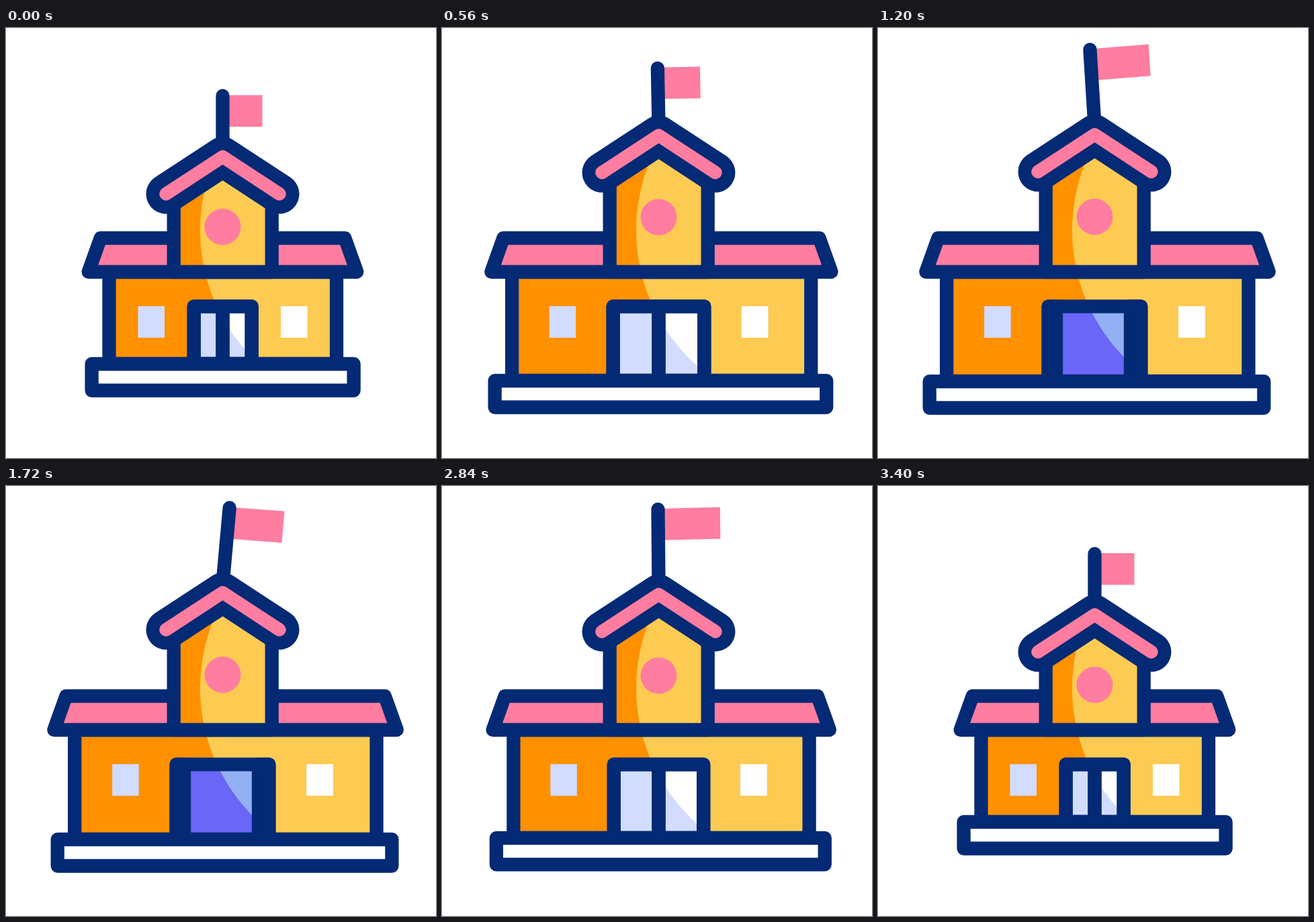
Recreate the animation shown at these times as an HTML page with a canvas. Size 640x640 px, loop 3560 ms.

```html
<!DOCTYPE html>
<html lang="en">
<head>
<meta charset="utf-8">
<title>School</title>
<style>
html, body { margin: 0; width: 100%; height: 100%; overflow: hidden; background: #fff; }
canvas { display: block; width: 640px; height: 640px; }
</style>
</head>
<body>
<canvas id="stage" width="640" height="640"></canvas>
<script>
const ctx = document.getElementById('stage').getContext('2d');
const NAVY = '#042a75', PINK = '#ff7da0';
const WALL = ['#ff9100', '#fdcb52'];
const GLASS = ['#d2dcff', '#ffffff'];
const HALL = ['#6a66f7', '#92b0f3'];
const LOOP = 3560, MID = 322.5;

// Lists of [time, value], eased between neighbours
const GROW = [[240, 0], [607, 1], [2730, 1], [3330, 0]];
const POLE = [[392, 0], [886, 1], [2840, 1], [3395, 0]];
const DOOR = [[700, 0], [1160, 1], [2410, 1], [2800, 0]];
const SWAY = [[350, 0], [1040, -5], [1700, 5.2], [2340, -5.1], [2970, 0]];
const FLAG = [[300, 49], [1400, 80], [2240, 55], [2860, 82.5], [3390, 49]];

const lerp = (a, b, u) => a + (b - a) * u;

function track(keys, t) {
  if (t <= keys[0][0]) return keys[0][1];
  for (let i = 1; i < keys.length; i++) {
    const [t0, v0] = keys[i - 1], [t1, v1] = keys[i];
    if (t < t1) return lerp(v0, v1, (1 - Math.cos(Math.PI * (t - t0) / (t1 - t0))) / 2);
  }
  return keys[keys.length - 1][1];
}

function poly(closed, ...xy) {
  const path = new Path2D();
  for (let i = 0; i < xy.length; i += 2) path.lineTo(xy[i], xy[i + 1]);
  if (closed) path.closePath();
  return path;
}

const box = (x0, y0, x1, y1) => poly(true, x0, y0, x1, y0, x1, y1, x0, y1);

function fill(path, color) {
  ctx.fillStyle = color;
  ctx.fill(path);
}

function stroke(path, width = 20.3, color = NAVY) {
  ctx.lineWidth = width;
  ctx.strokeStyle = color;
  ctx.stroke(path);
}

const light = new Path2D();
light.arc(559, 301, 270, 0, 7);

// Shaded fill, brighter inside the large light circle
function shade(path, [dark, bright]) {
  fill(path, dark);
  ctx.save();
  ctx.clip(light);
  fill(path, bright);
  ctx.restore();
}

function drawFlag(t, grow) {
  const rise = track(POLE, t), top = 101 - 33 * grow - 36 * rise;
  const pivot = 178 - 33 * grow, width = track(FLAG, t);
  ctx.save();
  ctx.translate(MID, pivot);
  ctx.rotate(track(SWAY, t) * Math.PI / 180);
  ctx.translate(-MID, -pivot);
  const lift = width * 0.018 * rise, end = 332.5 + width;
  fill(poly(true, MID, top - 1, end, top - 1 - lift, end, top + 46 - lift, MID, top + 46), PINK);
  stroke(poly(false, MID, top, MID, pivot));
  ctx.restore();
}

function drawTower(grow) {
  const up = 33 * grow, left = 249.7, right = 395.7, eave = 260 - up;
  shade(poly(true, left, 363, left, eave, MID, 212 - up, right, eave, right, 363), WALL);
  stroke(poly(true, left, 363, left, eave, left, 363, right, 363, right, eave, right, 363));
  const roof = poly(false, 238, 247 - up, MID, 191.6 - up, 407, 247 - up);
  stroke(roof, 59);
  stroke(roof, 19.5, PINK);
  const disc = new Path2D();
  disc.arc(MID, 296 - 15 * grow, 27, 0, 7);
  fill(disc, PINK);
}

function drawDoor(t, grow, floor) {
  const open = track(DOOR, t);
  const left = lerp(279.7, 253.7, grow), right = lerp(365.7, 391.3, grow);
  const frame = box(left, 414.3, right, floor);
  shade(frame, HALL);
  const leaves = [
    box(left, 414.3, lerp(MID, 265, open), floor),
    box(lerp(MID, 376, open), 414.3, right, floor)
  ];
  leaves.forEach(leaf => shade(leaf, GLASS));
  leaves.forEach(leaf => stroke(leaf));
  stroke(frame);
}

function draw(t) {
  ctx.fillStyle = '#fff';
  ctx.fillRect(0, 0, 640, 640);
  ctx.lineCap = ctx.lineJoin = 'round';
  const grow = track(GROW, t);
  const l = -51.3 * grow, r = 59.5 * grow, floor = 500 + 26 * grow;

  drawFlag(t, grow);

  const wallL = 153.5 + l, wallR = 492 + r;
  const walls = box(wallL, 363, wallR, floor);
  shade(walls, WALL);
  stroke(walls);
  const wings = poly(true, 122.7 + l, 363, 140.7 + l, 312.7, 504.3 + r, 312.7, 522.3 + r, 363);
  fill(wings, PINK);
  stroke(wings);

  drawTower(grow);

  const shift = 38.3 * grow;
  shade(box(196.5 - shift, 414, 236 - shift, 461), GLASS);
  shade(box(409 + shift, 414, 448.5 + shift, 461), GLASS);

  drawDoor(t, grow, floor);

  const base = box(127.6 - 50.9 * grow, floor, 517.6 + 56.8 * grow, floor + 39.5);
  fill(base, '#fff');
  stroke(base);
}

const start = performance.now();
function tick() {
  draw((performance.now() - start) % LOOP);
  requestAnimationFrame(tick);
}
tick();
</script>
</body>
</html>
```
